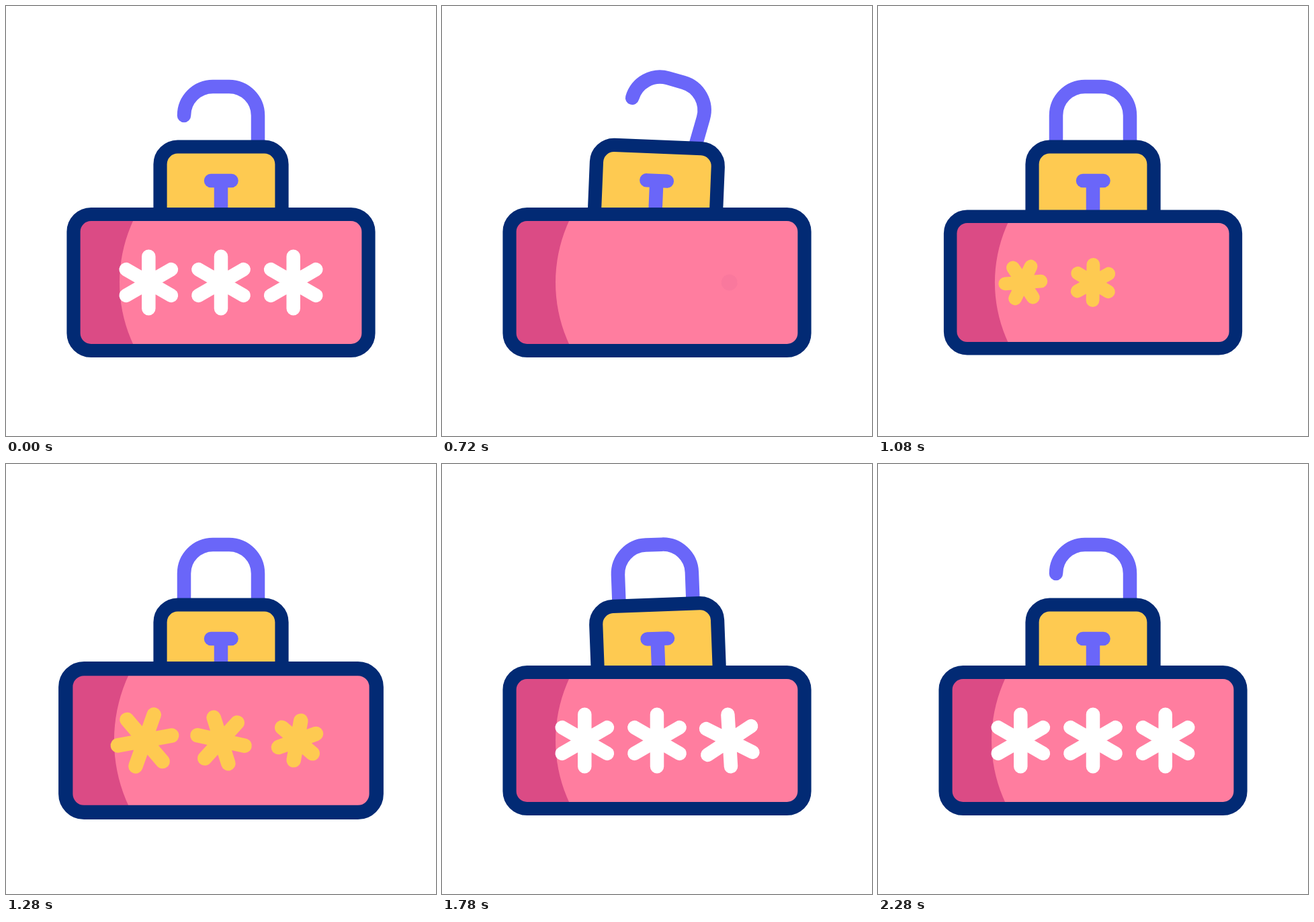
An HTML page with a canvas that plays this animation: 640x640 px, repeating every 2400 ms.

```html
<!DOCTYPE html>
<html lang="en">
<head>
<meta charset="utf-8">
<title>Password lock</title>
<style>
  html, body { margin: 0; width: 100%; height: 100%; overflow: hidden; background: #fff; }
  canvas { display: block; width: 100vw; height: 100vh; }
</style>
</head>
<body>
<canvas id="stage" width="640" height="640"></canvas>
<script>
const ctx = document.getElementById('stage').getContext('2d');
const LOOP = 2400, STEP = 20, STAGGER = 80, ARM = 38.8;
const NAVY = '#022a74', PINK = '#ff7d9f', PURPLE = '#6a66f9';
const YELLOW = [254, 202, 81], SHADE = [219, 75, 133], WHITE = [255, 255, 255];

const clamp = u => Math.max(0, Math.min(1, u));
const span = (t, a, b) => clamp((t - a) / (b - a));
const ramp = (t, a, b) => {
  const u = span(t, a, b);
  return u * u * (3 - 2 * u);
};
// Rises from a to the peak, falls back until b.
const bump = (t, a, peak, b) => ramp(t, a, peak) - ramp(t, peak, b);
const rgb = c => `rgb(${c.map(Math.round).join(',')})`;
const mix = (a, b, u) => a.map((v, i) => v + (b[i] - v) * u);

// The lock sways left, then right, once before closing and once before opening.
const sway = t => -10 * bump(t, 220, 420, 640) + 6 * bump(t, 420, 640, 780);
const bodyAngle = t => sway(t) + sway(t - 1500);
const hingeAngle = t => -8.2 * bump(t, 220, 420, 630)
  + 22 * bump(t, 630, 785, 960) + 14 * bump(t, 1960, 2100, 2280);
const legEnd = t => 163 + 43 * (ramp(t, 880, 960) - ramp(t, 1960, 2040));
const panelScale = t => 1 - 0.045 * bump(t, 750, 1020, 1290)
  + 0.054 * bump(t, 1020, 1290, 1450) - 0.014 * bump(t, 1290, 1450, 1620);

// A star spins in fast, overshoots by ten degrees and settles.
const starSpin = t => 165 * Math.pow(1 - span(t, 930, 1480), 1.7)
  - 10 * (1 - ramp(t, 1480, 1710));
const starGrowth = t => 0.71 * ramp(t, 930, 990) + 0.29 * ramp(t, 1090, 1290);

function turn(x, y, deg) {
  ctx.translate(x, y);
  ctx.rotate(deg * Math.PI / 180);
  ctx.translate(-x, -y);
}

function stroke(color, width = 20.5, cap = 'round') {
  ctx.strokeStyle = color;
  ctx.lineWidth = width;
  ctx.lineCap = cap;
  ctx.stroke();
}

function line(x0, y0, x1, y1, cap) {
  ctx.beginPath();
  ctx.moveTo(x0, y0);
  ctx.lineTo(x1, y1);
  stroke(PURPLE, 20.5, cap);
}

function drawShackle(t) {
  ctx.save();
  turn(375, 208, hingeAngle(t));
  ctx.beginPath();
  ctx.moveTo(265, legEnd(t));
  ctx.lineTo(265, 163);
  ctx.arc(308, 163, 43, Math.PI, Math.PI * 1.5);
  ctx.arc(332, 163, 43, -Math.PI / 2, 0);
  ctx.lineTo(375, 218);
  stroke(PURPLE);
  ctx.restore();
}

function drawLock(t) {
  ctx.save();
  turn(320, 245, bodyAngle(t));
  drawShackle(t);
  ctx.beginPath();
  ctx.roundRect(229.5, 209.5, 181, 180, 26);
  ctx.fillStyle = rgb(YELLOW);
  ctx.fill();
  stroke(NAVY, 20.2);
  line(305, 260, 335.5, 260);
  line(320, 260, 320, 325, 'butt');
  ctx.restore();
}

function drawStar(x, t) {
  if (t >= 580 && t <= 930) return;
  const leaving = t < 580;
  const gone = span(t, 430, 580);
  const size = 1 + 0.1 * bump(t, 260, 430, 580);
  const arm = ARM * (leaving ? 1 - ramp(t, 430, 580) : starGrowth(t));
  const color = leaving ? mix(WHITE, SHADE, gone) : mix(YELLOW, WHITE, span(t, 1300, 1388));

  ctx.save();
  ctx.globalAlpha = leaving ? clamp(1.5 * (1 - gone)) : 1;
  turn(x, 411.5, leaving ? 0 : starSpin(t));
  ctx.translate(x, 411.5);
  ctx.scale(size, size);
  ctx.beginPath();
  for (let i = 0; i < 3; i++) {
    const a = Math.PI / 2 + i * Math.PI / 3;
    const dx = Math.cos(a) * arm, dy = Math.sin(a) * arm;
    ctx.moveTo(-dx, -dy);
    ctx.lineTo(dx, dy);
  }
  stroke(rgb(color));
  ctx.restore();
}

function drawPanel(t) {
  const s = panelScale(t);
  ctx.save();
  ctx.translate(320, 411.5);
  ctx.scale(s, s);
  ctx.translate(-320, -411.5);
  const frame = new Path2D();
  frame.roundRect(100.5, 310, 439, 203, 26);
  ctx.save();
  ctx.clip(frame);
  ctx.fillStyle = rgb(SHADE);
  ctx.fillRect(100, 309, 440, 205);
  ctx.beginPath();
  ctx.arc(388, 411.5, 219, 0, Math.PI * 2);
  ctx.fillStyle = PINK;
  ctx.fill();
  ctx.restore();
  ctx.strokeStyle = NAVY;
  ctx.lineWidth = 20.2;
  ctx.stroke(frame);
  for (let i = 0; i < 3; i++) drawStar(212.3 + i * 107.7, t - i * STAGGER);
  ctx.restore();
}

function draw(t) {
  ctx.fillStyle = '#fff';
  ctx.fillRect(0, 0, 640, 640);
  drawLock(t);
  drawPanel(t);
}

const start = performance.now();
function tick() {
  const t = (performance.now() - start) % LOOP;
  draw(Math.floor(t / STEP) * STEP);
  requestAnimationFrame(tick);
}
tick();
</script>
</body>
</html>
```
